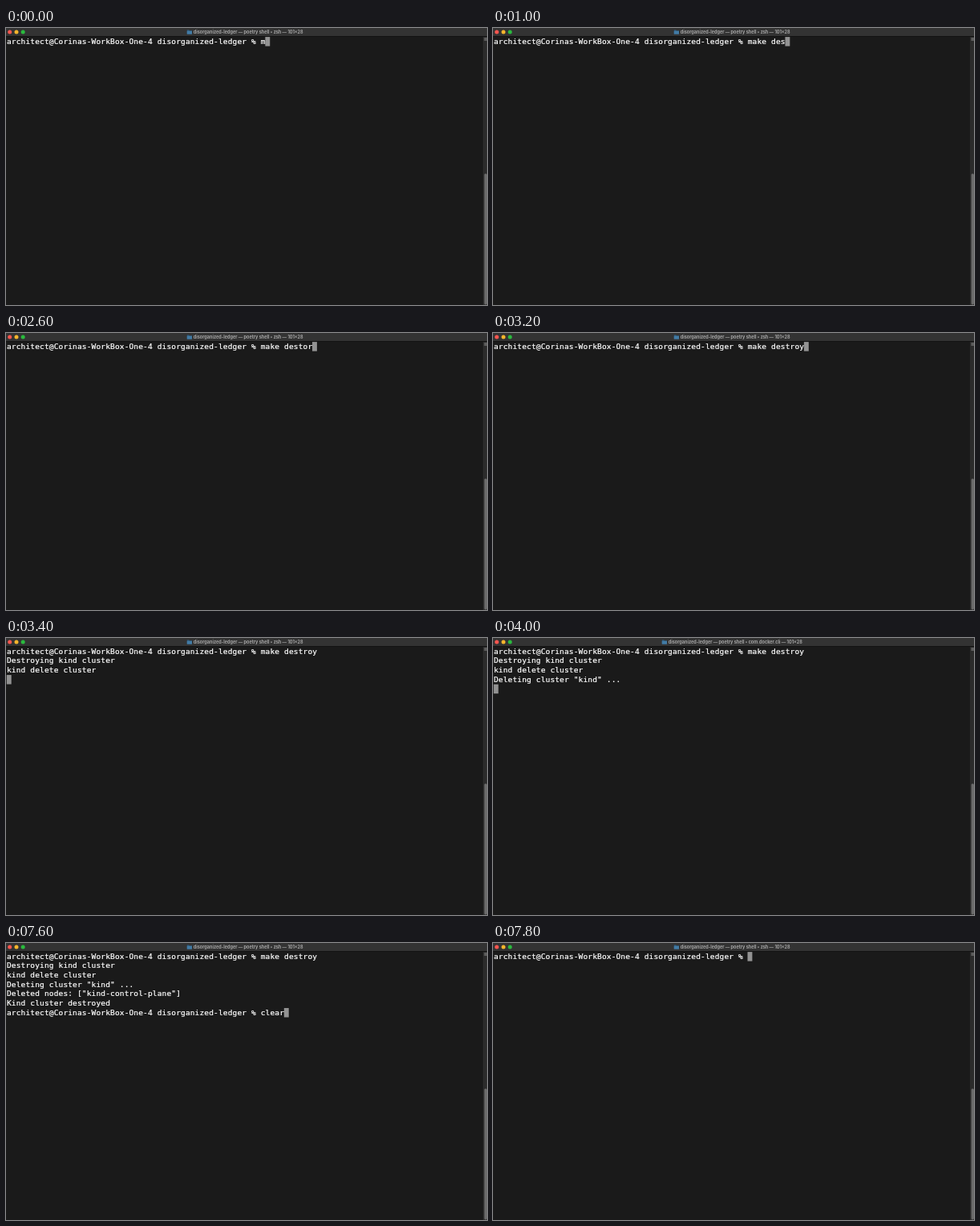
An HTML page for the animation above (8000 ms loop, 600 px wide and 345 px high).

```html
<!DOCTYPE html>
<html lang="en">
<head>
<meta charset="utf-8">
<title>Terminal</title>
<style>
html, body { margin: 0; width: 100%; height: 100%; overflow: hidden; background: #1a1a1a; }
svg { display: block; width: 100vw; height: 100vh; }
text { white-space: pre; }
.line { font: 9.5px "DejaVu Sans Mono", monospace; letter-spacing: .146px; fill: #fff; stroke: #fff; stroke-width: .22; }
#title { font: 700 5.5px Inter, sans-serif; fill: #a6a6a6; }
</style>
</head>
<body>
<svg viewBox="0 0 600 345">
  <rect width="600" height="345" fill="#1a1a1a"/>
  <rect width="600" height="10" fill="#333"/>
  <rect y="10" width="600" height="1" fill="#121212"/>
  <circle cx="4.7" cy="5" r="2.5" fill="#f9564f"/>
  <circle cx="13" cy="5" r="2.5" fill="#f5b52c"/>
  <circle cx="21.2" cy="5" r="2.5" fill="#2abb3e"/>
  <g id="folder">
    <path d="M0 2.4h2.4l.8.8h3v4.4h-6.2z" fill="#33658a"/>
    <path d="M0 4h6.2v3.6h-6.2z" fill="#427ba5"/>
  </g>
  <text id="title" y="7"></text>
  <rect x="595" y="11" width="5" height="334" fill="#2b2b2b"/>
  <rect x="596.4" y="12" width="3.6" height="4" fill="#5c5c5c"/>
  <rect x="596.6" y="181.5" width="3.4" height="163" rx="1.4" fill="#6b6b6b"/>
  <rect id="cursor" width="5.9" height="11.5" fill="#939393"/>
  <g id="screen"></g>
</svg>
<script>
const LOOP = 8000, COL = 5.865, ROW = 11.65, LEFT = 0.8, TOP = 11.1;
const $ = id => document.getElementById(id);
const prompt = "architect@Corinas-WorkBox-One-4 disorganized-ledger % ";
const shell = { x: 233.8, name: "zsh" };
const docker = { x: 218.8, name: "com.docker.cli" };

// What has been typed at the prompt, by start time
const typed = [
  [0, "m"], [200, "mak"], [400, "make "], [600, "make de"], [1000, "make des"],
  [1400, "make de"], [1600, "make dest"], [1800, "make desto"], [2000, "make destory"],
  [2600, "make destor"], [2800, "make dest"], [3000, "make destr"], [3200, "make destroy"],
  [6600, ""], [7000, "c"], [7200, "cl"], [7400, "cle"], [7600, "clear"], [7800, ""]
];
// Output that follows the command
const output = [
  [3400, "Destroying kind cluster"], [3400, "kind delete cluster"],
  [3600, 'Deleting cluster "kind" ...'],
  [6600, 'Deleted nodes: ["kind-control-plane"]'], [6600, "Kind cluster destroyed"]
];

const rows = Array.from({ length: 7 }, (_, i) => {
  const row = document.createElementNS("http://www.w3.org/2000/svg", "text");
  row.setAttribute("class", "line");
  row.setAttribute("x", LEFT + 0.2);
  row.setAttribute("y", TOP + i * ROW + 8.7);
  return $("screen").appendChild(row);
});

function linesAt(t) {
  const input = prompt + typed.filter(([start]) => start <= t).pop()[1];
  if (t < 3400 || t >= 7800) return [input];
  const printed = output.filter(([start]) => start <= t).map(([, text]) => text);
  return [prompt + "make destroy", ...printed, t < 6600 ? "" : input];
}

function draw(t) {
  const lines = linesAt(t), last = lines.length - 1;
  rows.forEach((row, i) => { row.textContent = lines[i] || ""; });
  $("cursor").setAttribute("x", LEFT + lines[last].length * COL);
  $("cursor").setAttribute("y", TOP + last * ROW);

  const app = t >= 3600 && t < 6600 ? docker : shell;
  $("title").setAttribute("x", app.x);
  $("title").textContent = `disorganized-ledger — poetry shell • ${app.name} — 101×28`;
  $("folder").setAttribute("transform", `translate(${app.x - 8} 0)`);
}

const begin = performance.now();
function frame() {
  draw((performance.now() - begin) % LOOP);
  requestAnimationFrame(frame);
}
draw(0);
requestAnimationFrame(frame);
</script>
</body>
</html>
```
